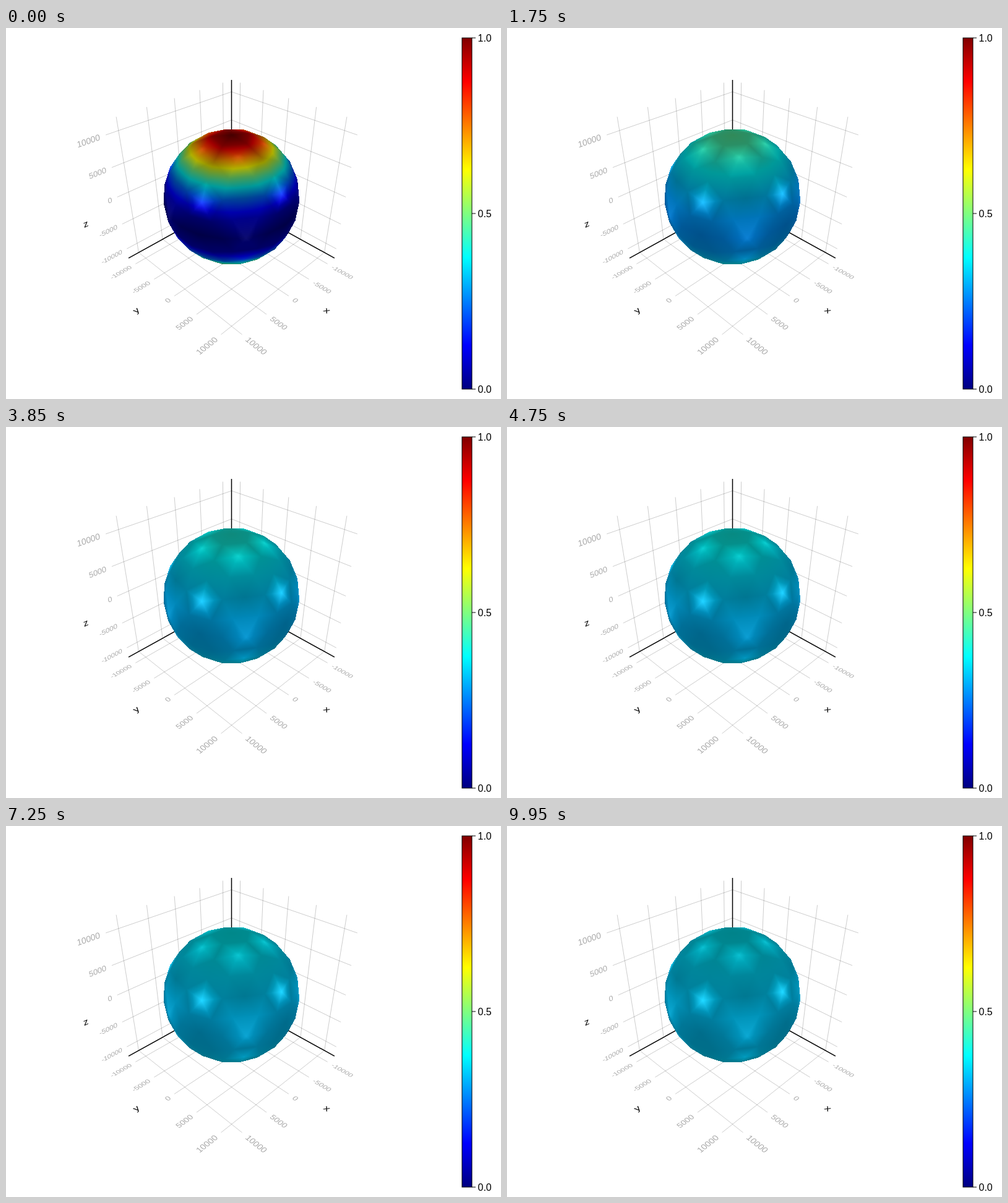
Animation of 800 by 600 pixels, one loop 10 s. Source, as an HTML page with a canvas:

```html
<!DOCTYPE html>
<html>
<head>
<meta charset="utf-8">
<style>
html, body { margin: 0; width: 100%; height: 100%; overflow: hidden; background: #fff; }
svg { position: absolute; left: 0; top: 0; }
canvas { position: absolute; left: 253px; top: 162px; }
text { font-family: "Liberation Sans", Arial, sans-serif; }
</style>
</head>
<body>
<svg id="plot" width="800" height="600">
  <defs>
    <linearGradient id="jet" x1="0" y1="1" x2="0" y2="0">
      <stop offset="0" stop-color="#000080"/>
      <stop offset=".125" stop-color="#00f"/>
      <stop offset=".375" stop-color="#0ff"/>
      <stop offset=".625" stop-color="#ff0"/>
      <stop offset=".875" stop-color="#f00"/>
      <stop offset="1" stop-color="#800000"/>
    </linearGradient>
  </defs>
  <rect x="737" y="16" width="16" height="568" fill="url(#jet)" stroke="#000"/>
</svg>
<canvas id="ball" width="224" height="224"></canvas>
<script>
// 45 degree field of view over a viewport 568 pixels high.
const FOCAL = 284 / Math.tan(Math.PI / 8), DIST = 6.3, LIFT = 0.244, CENTER_X = 364.5, CENTER_Y = 300;
const plot = document.getElementById('plot');

function add(tag, attrs, content = '') {
  const el = document.createElementNS('http://www.w3.org/2000/svg', tag);
  for (const key in attrs) el.setAttribute(key, attrs[key]);
  el.textContent = content;
  plot.append(el);
}

// Perspective view along the (1,1,1) diagonal.
function project([x, y, z]) {
  const k = FOCAL / (DIST - (x + y + z) / Math.sqrt(3));
  const up = (2 * z - x - y) / Math.sqrt(6) + LIFT;
  return [CENTER_X + k * (y - x) / Math.SQRT2, CENTER_Y - k * up];
}

function line(a, b, stroke, width) {
  const [x1, y1] = project(a), [x2, y2] = project(b);
  add('line', { x1, y1, x2, y2, stroke, 'stroke-width': width });
}

// Text lying in the plane spanned by the directions `along` and `up`.
function planeText(content, pos, along, up, size, anchor, fill) {
  const eps = 0.01, o = project(pos);
  const slope = (dir, sign) => {
    const p = project(pos.map((v, i) => v + dir[i] * eps));
    return p.map((v, i) => sign * (v - o[i]) / eps * size / 100);
  };
  const m = [...slope(along, 1), ...slope(up, -1), ...o];
  add('text', { transform: `matrix(${m})`, 'font-size': 100, 'text-anchor': anchor, y: 35, fill }, content);
}

const E = 1.2, G = E + 0.09, GRID = 'rgba(0,0,0,.2)', GREY = '#aaa', BLACK = '#000';
const NEG_X = [-1, 0, 0], POS_Y = [0, 1, 0], NEG_Y = [0, -1, 0], POS_Z = [0, 0, 1];
for (let t = -1; t <= 1; t += 0.5) {
  line([t, -E, -E], [t, E, -E], GRID, 1);
  line([-E, t, -E], [E, t, -E], GRID, 1);
  line([t, -E, -E], [t, -E, E], GRID, 1);
  line([-E, t, -E], [-E, t, E], GRID, 1);
  line([-E, -E, t], [E, -E, t], GRID, 1);
  line([-E, -E, t], [-E, E, t], GRID, 1);
  const label = String(t * 10000);
  planeText(label, [t, G, -E], POS_Y, NEG_X, 0.124, 'start', GREY);
  planeText(label, [G, t, -E], NEG_X, NEG_Y, 0.124, 'end', GREY);
  planeText(label, [G, -E, t], NEG_X, POS_Z, 0.124, 'end', GREY);
}
for (const end of [[E, -E, -E], [-E, E, -E], [-E, -E, E]]) line([-E, -E, -E], end, BLACK, 1.5);
planeText('x', [-0.17, 1.765, -E], POS_Y, NEG_X, 0.15, 'middle', BLACK);
planeText('y', [1.765, -0.17, -E], NEG_X, NEG_Y, 0.15, 'middle', BLACK);
planeText('z', [1.76, -E, -0.2], NEG_X, POS_Z, 0.15, 'middle', BLACK);

for (let value = 0; value <= 1; value += 0.5) {
  const y = 584 - 568 * value;
  add('line', { x1: 753, x2: 759, y1: y, y2: y, stroke: BLACK });
  add('text', { x: 762.5, y: y + 6, 'font-size': 16 }, value.toFixed(1));
}

const RAD = Math.PI / 180;
const dot = (a, b) => a[0] * b[0] + a[1] * b[1] + a[2] * b[2];
const unit = v => v.map(c => c / Math.hypot(...v));
const middle = (a, b) => unit(a.map((c, i) => c + b[i]));

// Five points around the z axis at one latitude.
const ring = (lat, lon) => [0, 1, 2, 3, 4].map(k => {
  const a = (lon + 72 * k) * RAD, r = Math.cos(lat * RAD);
  return [r * Math.cos(a), r * Math.sin(a), Math.sin(lat * RAD)];
});

const TURN = 20;
function icosphere(levels) {
  const upper = ring(26.565, TURN), lower = ring(-26.565, TURN + 36);
  let faces = upper.flatMap((u, k) => {
    const u2 = upper[(k + 1) % 5], l = lower[k], l2 = lower[(k + 1) % 5];
    return [[[0, 0, 1], u, u2], [u, u2, l], [l, l2, u2], [[0, 0, -1], l, l2]];
  });
  while (levels--) {
    faces = faces.flatMap(([a, b, c]) => {
      const ab = middle(a, b), bc = middle(b, c), ca = middle(c, a);
      return [[a, ab, ca], [b, bc, ab], [c, ca, bc], [ab, bc, ca]];
    });
  }
  return faces;
}

// Rings of bright spots that follow the fivefold mesh.
const spot = (lat, lon, width, strength) => ring(lat, lon).map(dir => ({ dir, width, strength }));
const spots = [
  ...spot(58, TURN + 36, 0.2, 0.3), ...spot(26.565, TURN, 0.21, 0.36),
  ...spot(9, TURN + 36, 0.25, 0.36), ...spot(-26.565, TURN + 36, 0.2, 0.2)
];
const shadeAt = p => spots.reduce((sum, s) =>
  sum + s.strength * Math.exp(2 * (dot(p, s.dir) - 1) / s.width ** 2), 0.54);
const startValue = p => Math.abs(p[2]) ** 2.2;

const SIZE = 224, LEFT = 253, TOP = 162;
const start = new Float32Array(SIZE * SIZE), shade = new Float32Array(SIZE * SIZE);

// Interpolates corner values over the pixels of one triangle.
function fillTriangle(corners) {
  const [a, b, c] = corners.map(p => project(p).map((v, i) => v - (i ? TOP : LEFT)));
  const area = (b[0] - a[0]) * (c[1] - a[1]) - (c[0] - a[0]) * (b[1] - a[1]);
  const values = corners.map(startValue), shades = corners.map(shadeAt);
  const xs = [a[0], b[0], c[0]], ys = [a[1], b[1], c[1]];
  for (let y = Math.floor(Math.min(...ys)); y <= Math.max(...ys); y++) {
    for (let x = Math.floor(Math.min(...xs)); x <= Math.max(...xs); x++) {
      const dx = x + 0.5 - a[0], dy = y + 0.5 - a[1];
      const v = (dx * (c[1] - a[1]) - dy * (c[0] - a[0])) / area;
      const w = (dy * (b[0] - a[0]) - dx * (b[1] - a[1])) / area;
      const weights = [1 - v - w, v, w];
      if (Math.min(...weights) < -1e-6) continue;
      start[y * SIZE + x] = dot(weights, values);
      shade[y * SIZE + x] = dot(weights, shades);
    }
  }
}

const nearness = face => face.flat().reduce((sum, c) => sum + c, 0);
icosphere(2).sort((a, b) => nearness(a) - nearness(b)).forEach(fillTriangle);

const ctx = document.getElementById('ball').getContext('2d');
const image = ctx.createImageData(SIZE, SIZE);
const jet = (v, peak) => Math.max(0, Math.min(1, 1.5 - Math.abs(4 * v - peak)));

function drawBall(seconds) {
  const spread = 1 / (1 + seconds / 0.42), mean = 0.335;
  for (let i = 0; i < start.length; i++) {
    if (!shade[i]) continue;
    const v = mean + (start[i] - mean) * spread;
    const gloss = Math.max(0, shade[i] - 0.72) * 180;
    for (let c = 0; c < 3; c++) image.data[4 * i + c] = 255 * shade[i] * jet(v, 3 - c) + gloss;
    image.data[4 * i + 3] = 255;
  }
  ctx.putImageData(image, 0, 0);
}

let lastStep = -1;
function frame() {
  const step = Math.floor(performance.now() % 10000 / 50);
  if (step !== lastStep) drawBall(step * 0.05);
  lastStep = step;
  requestAnimationFrame(frame);
}
frame();
</script>
</body>
</html>
```
